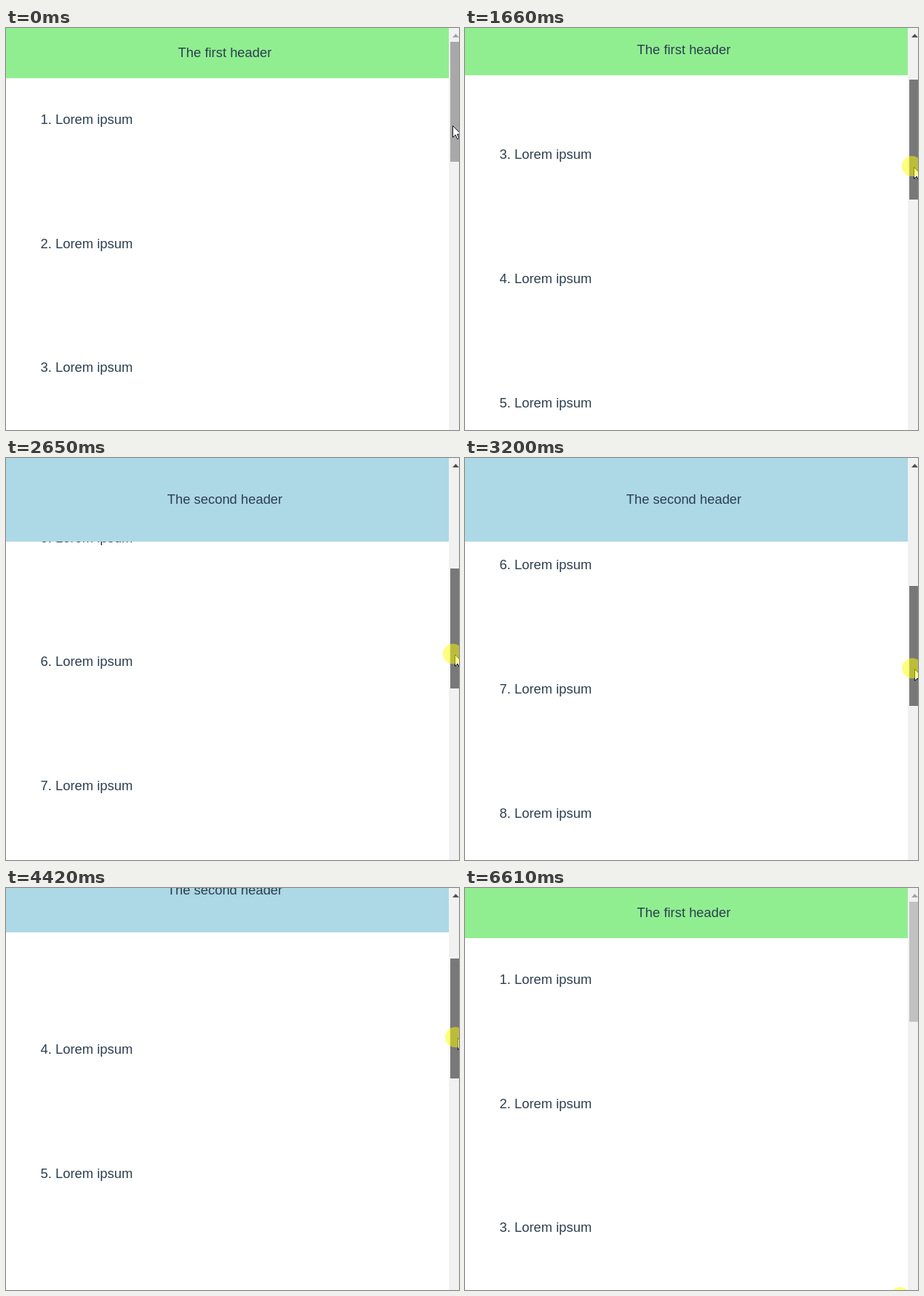
An HTML page that plays this animation: 623x553 px, repeating every 6740 ms.

```html
<!DOCTYPE html>
<html lang="en">
<head>
<meta charset="utf-8">
<title>Sticky headers</title>
<style>
  html, body { margin: 0; width: 100%; height: 100%; overflow: hidden; background: #fff; }
  svg { display: block; width: 623px; height: 553px; }
  text { font: 18.4px "Liberation Sans", Arial, sans-serif; fill: #2c3e50; }
  .header text { text-anchor: middle; }
</style>
</head>
<body>
<svg viewBox="0 0 623 553">
  <rect width="623" height="553" fill="#fff"/>
  <g id="list"></g>
  <g id="first" class="header">
    <rect width="609" height="69" fill="#90ee90"/>
    <text x="301" y="40">The first header</text>
  </g>
  <g id="second" class="header">
    <rect width="609" height="115" fill="#add8e6"/>
    <text x="301" y="63">The second header</text>
  </g>
  <rect x="609" width="14" height="553" fill="#f1f1f1"/>
  <path id="arrow" d="M618.5 8L623 13H614Z"/>
  <rect id="thumb" x="611" width="14" height="165"/>
  <path id="cursor" d="M.5 .5V16.5L4.2 13 6.7 18.6 9 17.6 6.6 12.1H11.8Z" fill="#fff" stroke="#101020"/>
  <circle id="spot" r="14" fill="#ff0" fill-opacity=".5"/>
</svg>
<script>
// All times below count screen refreshes of STEP ms.
const LOOP = 6740, STEP = 110, SLIDE = 3.64;
const ROW = 170.65, PX_PER_THUMB = 5.6;
const PRESS = 4, RELEASE = 53, LAST_CLICK = 60;
const scrollKeys = [[7, 0], [10, 58], [20, 562], [29, 878], [30, 878], [40, 435], [46, 79], [49.5, 0]];
const cursorKeys = [[0, 614], [4, 617], [29, 617.5], [40, 620.5], [51, 616], [60, 601]];
const ui = Object.fromEntries([...document.querySelectorAll('[id]')].map(e => [e.id, e]));

// Smooth curve through the keys that never overshoots them
function curve(keys, t) {
  const last = keys.length - 1;
  if (t <= keys[0][0]) return keys[0][1];
  if (t >= keys[last][0]) return keys[last][1];
  const rate = i => (keys[i + 1][1] - keys[i][1]) / (keys[i + 1][0] - keys[i][0]);
  const slope = i => {
    if (i === 0 || i === last) return 0;
    const a = rate(i - 1), b = rate(i);
    return a * b > 0 ? 2 * a * b / (a + b) : 0;
  };
  const i = keys.findIndex(k => k[0] > t) - 1;
  const [t0, v0] = keys[i], [t1, v1] = keys[i + 1];
  const d = t1 - t0, u = (t - t0) / d, w = 1 - u;
  return v0 * w * w * (1 + 2 * u) + v1 * u * u * (1 + 2 * w)
    + d * u * w * (slope(i) * w - slope(i + 1) * u);
}

// CSS "ease" timing curve
function ease(x) {
  if (x <= 0) return 0;
  if (x >= 1) return 1;
  const bez = (s, p, q) => 3 * (1 - s) ** 2 * s * p + 3 * (1 - s) * s * s * q + s ** 3;
  let lo = 0, hi = 1;
  for (let i = 0; i < 24; i++) {
    const mid = (lo + hi) / 2;
    if (bez(mid, .25, .25) < x) lo = mid; else hi = mid;
  }
  return bez(lo, .1, 1);
}

const slide = (t, start) => ease((t - start) / SLIDE);
const move = (el, x, y) => el.setAttribute('transform', `translate(${x} ${y})`);
const fill = (el, color) => el.setAttribute('fill', color);

for (let n = 1; n <= 10; n++) {
  const row = document.createElementNS('http://www.w3.org/2000/svg', 'text');
  row.setAttribute('x', 47.5);
  row.setAttribute('y', Math.round(132 + ROW * (n - 1)));
  row.textContent = `${n}. Lorem ipsum`;
  ui.list.append(row);
}

function draw(t) {
  const scroll = curve(scrollKeys, t);
  const firstShown = 1 - slide(t, 14.74) + slide(t, 43);
  const secondShown = slide(t, 18.38) - slide(t, 38.98);
  const gap = 46 * secondShown ** 1.4; // the second header is 46px taller
  const pressed = t >= PRESS && t < RELEASE;

  // The pointer runs half a step ahead of the page, then drops off the bottom
  const x = curve(cursorKeys, t);
  const drop = 18 * Math.max(0, t - RELEASE) ** 2;
  const y = Math.min(564, 133.5 + curve(scrollKeys, t + .5) / PX_PER_THUMB + drop);

  move(ui.list, 0, Math.round(gap - scroll));
  move(ui.first, 0, Math.round(69 * (firstShown - 1)));
  move(ui.second, 0, Math.round(115 * (secondShown - 1)));

  ui.thumb.setAttribute('y', Math.round(19 + scroll / PX_PER_THUMB));
  fill(ui.thumb, pressed ? '#787878' : y < 184 ? '#a8a8a8' : '#c1c1c1');
  fill(ui.arrow, scroll > 0 ? '#505050' : '#a3a3a3');

  move(ui.cursor, Math.round(x), Math.round(y));
  move(ui.spot, x - 2.5, y - 1);
  ui.spot.style.display = pressed || t >= LAST_CLICK ? '' : 'none';
}

const start = performance.now();
function loop() {
  draw(Math.floor((performance.now() - start) % LOOP / STEP));
  requestAnimationFrame(loop);
}
loop();
</script>
</body>
</html>
```
